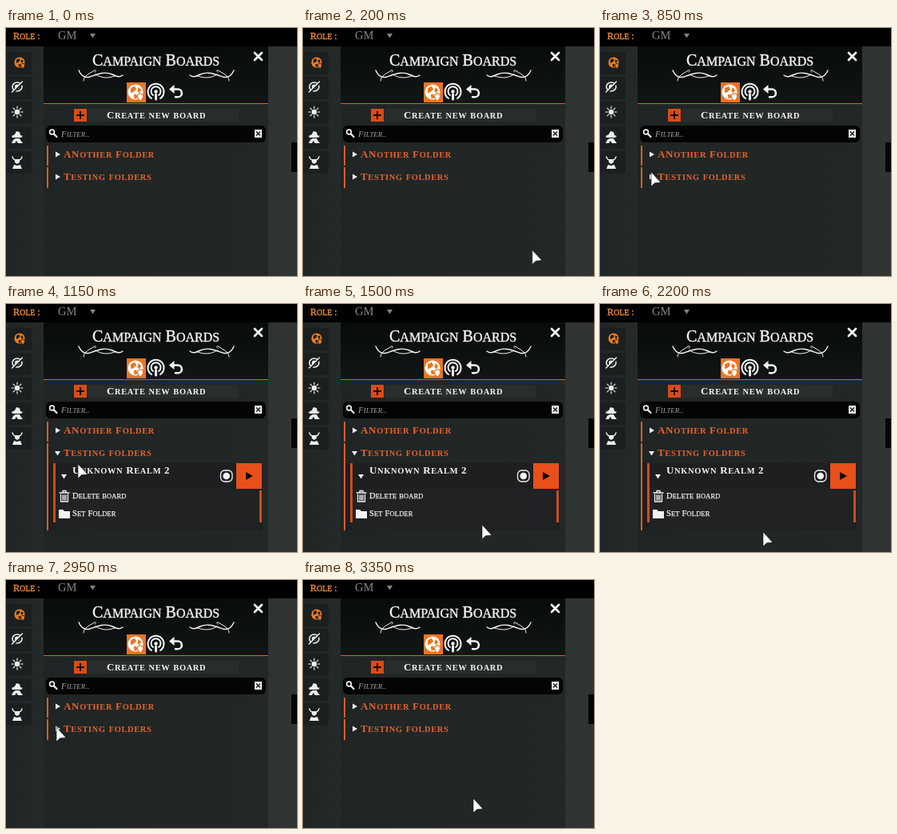
An HTML page that plays this animation: 364 by 310 pixels, repeating every 3400 ms.

```html
<!DOCTYPE html>
<html lang="en">
<head>
<meta charset="utf-8">
<title>Campaign Boards</title>
<style>
  html, body { margin: 0; width: 100%; height: 100%; overflow: hidden; background: #202424; }
  svg { display: block; width: 364px; height: 310px; }
  text { font-family: "Liberation Serif", "Times New Roman", serif; white-space: pre; }
  .bold { font-weight: bold; letter-spacing: .68px; }
  .small { letter-spacing: .2px; stroke: #f0f0f0; stroke-width: .25px; }
  .thick { stroke: currentColor; stroke-width: .4px; }
  .line { fill: none; stroke: #f2f2f2; stroke-linecap: round; stroke-linejoin: round; }
</style>
</head>
<body>
<svg viewBox="0 0 364 310" xmlns="http://www.w3.org/2000/svg">
  <defs>
    <linearGradient id="wall">
      <stop offset="0" stop-color="#202626"/><stop offset=".15" stop-color="#252a2a"/><stop offset="1" stop-color="#303432"/>
    </linearGradient>
    <linearGradient id="panel">
      <stop offset="0" stop-color="#1f2525"/><stop offset="1" stop-color="#242727"/>
    </linearGradient>
    <linearGradient id="head" x2="0" y2="1">
      <stop offset="0" stop-color="#080b0b"/><stop offset="1" stop-color="#111515"/>
    </linearGradient>
    <g id="globe">
      <circle r="8"/>
      <path d="M-5-4L-1-6L1-3L-2 0L-5 1ZM3-5L6-2L4 1L2-1ZM-2 3L1 2L2 6L-1 7Z" fill="var(--land)"/>
      <path d="M5 1.5a3 3 0 0 1 3 3c0 2-3 5-3 5s-3-3-3-5a3 3 0 0 1 3-3Z" stroke="var(--land)"/>
    </g>
    <g id="flourish" class="line">
      <path d="M91 53C94 60 98 63 105 61C116 57 124 54 133 58C139 61 142 62 146 59" stroke-width="1.400"/>
      <path d="M97 66C97 60 104 57 109 54C112 51 114 54 111 55M112 58C120 63 128 63 136 60" stroke-width="1"/>
    </g>
  </defs>

  <rect width="364" height="310" fill="url(#wall)"/>
  <rect x="357" y="143" width="7" height="37" fill="#030404"/>
  <rect x="47" y="94" width="281" height="216" fill="url(#panel)"/>
  <rect x="47" y="23" width="281" height="71" fill="url(#head)"/>
  <rect width="364" height="23" fill="#000"/>
  <path d="M105 7h7l-3.500 5.500Z" fill="#858585"/>

  <!-- sidebar -->
  <g fill="#1b1f1f">
    <rect y="30" width="32" height="28"/><rect y="61" width="32" height="28"/><rect y="92" width="32" height="28"/>
    <rect y="123" width="32" height="28"/><rect y="154" width="32" height="28"/>
  </g>
  <use href="#globe" transform="translate(17 43) scale(.82)" fill="#f07c1e" style="--land:#1b1f1f"/>
  <g transform="translate(14 73.500)">
    <ellipse rx="6" ry="5.500" class="line" stroke-width="1.600"/>
    <circle r="3" fill="#eee"/>
    <path d="M-6 7.500L8-6" stroke="#1b1f1f" stroke-width="3"/>
    <path d="M-6.500 6.500L6.500-6.500" class="line" stroke-width="1.400"/>
  </g>
  <g transform="translate(14 105)">
    <circle r="3.200" fill="#eee"/>
    <path id="rays" class="line" stroke-width="1.200"/>
  </g>
  <g transform="translate(14 136)" fill="#eee">
    <path d="M-3-3L-1-7L3-6L4-2L7-1L5 1H-6L-7-1Z"/>
    <path d="M-2 2H3L4 4L7 8H1L-1 5L-3 8H-7L-5 4Z"/>
  </g>
  <g transform="translate(14 168)" fill="#eee">
    <path d="M-6-7C-5-4-4-3-2-3M6-7C5-4 4-3 2-3" class="line" stroke-width="1.400"/>
    <path d="M-3-4H3V0L0 2L-3 0ZM-6 8L-4 3L0 4L4 3L6 8Z"/>
  </g>

  <!-- header -->
  <use href="#flourish"/>
  <use href="#flourish" transform="matrix(-1 0 0 1 376 0)"/>
  <path d="M311 31L320 40M320 31L311 40" class="line" stroke-width="2.800"/>
  <rect x="151" y="68" width="24" height="25" fill="#ee7420"/>
  <use href="#globe" transform="translate(162 80) scale(1.200)" fill="#fff" style="--land:#ee7420"/>
  <g class="line" stroke-width="2">
    <path d="M182 88A10 10 0 1 1 193 88M184 84A6 6 0 1 1 191 84"/>
    <circle cx="187.500" cy="79.500" r="2.200" fill="#f2f2f2" stroke="none"/>
    <path d="M187.500 83V89" stroke-width="3"/>
    <path d="M209 76.500H215A4.900 4.900 0 0 1 215 86.300H212" stroke-width="2.600"/>
  </g>
  <path d="M204 76.500L210.500 71V82Z" fill="#f2f2f2"/>
  <rect x="47" y="94" width="281" height="1" fill="#e0601e"/>

  <!-- create and filter -->
  <rect x="102" y="101" width="189" height="16" fill="#292d2d"/>
  <rect x="85" y="101" width="16" height="16" fill="#d84c18"/>
  <path d="M93 104V114M88 109H98" stroke="#170b06" stroke-width="2"/>
  <rect x="50" y="122" width="275" height="21" rx="6" fill="#030404"/>
  <circle cx="57.500" cy="130" r="2.900" class="line" stroke-width="1.600"/>
  <path d="M60 132.500L63.500 136" class="line" stroke-width="2.200"/>
  <rect x="311" y="127" width="9" height="10" fill="#f2f2f2"/>
  <path d="M313 129.500L318 134.500M318 129.500L313 134.500" stroke="#111" stroke-width="1.300"/>

  <!-- folders -->
  <rect x="51" y="147" width="2" height="25" fill="#e35a20"/>
  <rect id="bar" x="51" y="174" width="2" height="26" fill="#e35a20"/>
  <path d="M62 154.500L68 158L62 161.500Z" fill="#f2f2f2"/>
  <path id="arrow" fill="#f2f2f2"/>

  <g id="board">
    <rect x="53" y="199" width="268" height="84" fill="#1d2020"/>
    <rect x="62" y="199" width="226" height="32" fill="#1d1f20"/>
    <rect x="62" y="231" width="255" height="52" fill="#202224"/>
    <rect x="59" y="199" width="3" height="74" fill="#cf4d18"/>
    <rect x="317" y="233" width="3" height="40" fill="#cf4d18"/>
    <rect x="288" y="199" width="32" height="32" fill="#e8501a"/>
    <path d="M300 210L309 215L300 220Z" fill="#180b06"/>
    <path d="M69 213H76L72.500 218.500Z" fill="#f2f2f2"/>
    <rect x="268.500" y="208" width="14.500" height="14" rx="5" class="line" stroke-width="1.300"/>
    <circle cx="275.700" cy="215" r="4.300" fill="#f2f2f2"/>
    <path d="M67 236H79M71 236V233.500H75V236M68.500 238V247H77.500V238M71 239V245M73 239V245M75 239V245" class="line" stroke-width="1.300"/>
    <path d="M66 257H71L73 259H80V268H66Z" fill="#f2f2f2"/>
  </g>

  <g id="labels"></g>
  <path id="cursor" d="M0 0V18L4.500 13.800L12 13Z" fill="#fff" stroke="#111" stroke-width=".6"/>
</svg>

<script>
const LOOP = 3400, STEP = 50, OPEN = 1050, CLOSE = 2950;
const NS = "http://www.w3.org/2000/svg";
const byId = id => document.getElementById(id);
const board = byId("board"), cursor = byId("cursor");

// Capitals keep the full size, the other letters become smaller capitals.
function label(parent, text, x, y, size, color, cls = "", style = "") {
  const node = document.createElementNS(NS, "text");
  const set = (el, attrs) => Object.entries(attrs).forEach(([k, v]) => el.setAttribute(k, v));
  set(node, { x, y, color, fill: color, class: cls, style });
  for (const run of text.match(/[a-z]+|[^a-z]+/g)) {
    const span = document.createElementNS(NS, "tspan");
    set(span, { "font-size": /[a-z]/.test(run) ? size * .8 : size });
    span.textContent = run.toUpperCase();
    node.append(span);
  }
  parent.append(node);
}

const labels = byId("labels"), orange = "#e8622a", white = "#f4f4f4";
label(labels, "Role :", 9, 14, 12.2, "#f08a32", "thick");
label(labels, "GM", 65, 14, 14.5, "#888");
label(labels, "Campaign Boards", 108, 47, 20, white, "thick");
label(labels, "Create new board", 126, 113, 13, white, "bold");
label(labels, "Filter..", 69, 136, 11, "#a4a4a4", "", "font-style:italic");
label(labels, "ANother Folder", 72, 162, 13, orange, "bold");
label(labels, "Testing folders", 72, 190, 13, orange, "bold");
label(board, "Unknown Realm 2", 83, 212, 13, white, "bold");
label(board, "Delete board", 83, 243, 10.5, white, "small");
label(board, "Set Folder", 83, 265, 10.5, white, "small");

byId("rays").setAttribute("d", Array.from({ length: 8 }, (_, i) => {
  const a = i * Math.PI / 4, c = Math.cos(a), s = Math.sin(a);
  return `M${4.5 * c} ${4.5 * s}L${7 * c} ${7 * s}`;
}).join(""));

// time, x, y of the pointer tip
const path = [
  [50, 352, 300], [250, 265, 270], [350, 265, 270], [500, 176, 227],
  [600, 120, 203], [700, 86, 189], [850, 64, 180], [1000, 64, 180],
  [1150, 90, 200], [1300, 165, 246], [1500, 224, 276], [1550, 226, 283],
  [1600, 223, 285], [1750, 205, 285], [2150, 205, 285], [2200, 204, 285],
  [2300, 184, 268], [2400, 149, 237], [2550, 95, 193], [2700, 70, 185],
  [2800, 63, 184], [3200, 63, 184], [3250, 86, 197], [3350, 213, 273]
];

function tipAt(t) {
  const next = path.findIndex(p => p[0] >= t);
  const [t1, x1, y1] = path[next];
  const [t0, x0, y0] = path[Math.max(0, next - 1)];
  const k = t1 > t0 ? (t - t0) / (t1 - t0) : 1;
  return [x0 + (x1 - x0) * k, y0 + (y1 - y0) * k];
}

function draw(now) {
  const t = Math.floor(now % LOOP / STEP) * STEP;
  const open = t >= OPEN && t < CLOSE;
  const inside = t >= path[0][0];
  board.style.display = open ? "" : "none";
  byId("bar").setAttribute("height", open ? 109 : 26);
  byId("arrow").setAttribute("d", open ? "M61 184H68L64.500 189.500Z" : "M62 182.500L68 186L62 189.500Z");
  cursor.style.display = inside ? "" : "none";
  if (inside) cursor.setAttribute("transform", `translate(${tipAt(t)})`);
}

const start = performance.now();
function tick() {
  draw(performance.now() - start);
  requestAnimationFrame(tick);
}
tick();
</script>
</body>
</html>
```
